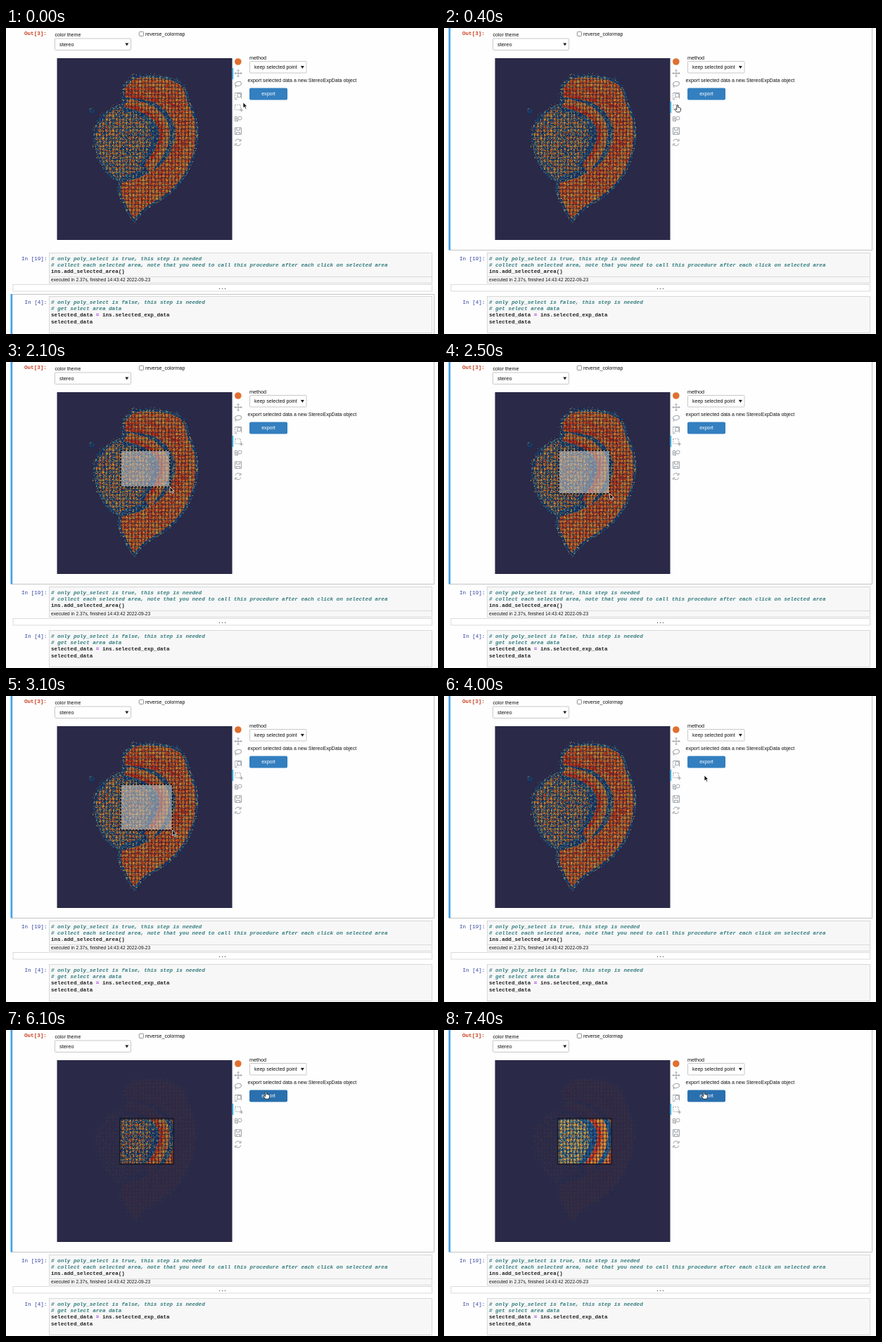
These frames come from a looping animation (614 px wide and 436 px high, 8000 ms). An HTML page with a canvas:

```html
<!DOCTYPE html>
<html lang="en">
<head>
<meta charset="utf-8">
<title>Area selection in a notebook</title>
<style>
html, body { margin: 0; width: 100%; height: 100%; overflow: hidden; background: #fefefe; }
svg, canvas { position: absolute; left: 0; top: 0; width: 614px; height: 436px; }
text { font: 7.05px "Liberation Sans", Arial, sans-serif; fill: #111; white-space: pre; }
.code text { font: bold 7.6px "Liberation Mono", "Courier New", monospace; fill: #222; }
.code .note { font-style: italic; fill: #347d7f; }
.code .prompt { font-weight: normal; fill: #303f9f; }
.code .out { fill: #c8401f; font-weight: bold; }
.box { fill: #f7f7f7; stroke: #d2d2d2; stroke-width: .8; }
.field { fill: #fff; stroke: #c8c8c8; }
.icons { fill: none; stroke: #9da2a7; stroke-width: 1; }
#picked { clip-path: inset(126px 376px 245px 162px); }
</style>
</head>
<body>
<svg viewBox="0 0 614 436">
  <rect width="614" height="436" fill="#fefefe"/>
  <g id="cell">
    <path id="frame" fill="none" stroke="#c4c4c4"/>
    <path id="bar" fill="#42a1e8"/>
  </g>

  <rect class="box" x="61.5" y="320.5" width="544" height="43"/>
  <path d="M62 354.5H605" stroke="#d5d5d5" stroke-width=".8"/>
  <rect x="10" y="365.5" width="595.5" height="9.5" fill="#fff" stroke="#d2d2d2" stroke-width=".8"/>
  <rect class="box" x="61.5" y="382.5" width="544" height="52"/>
  <g fill="#555"><circle cx="303.5" cy="371.5" r=".7"/><circle cx="307.5" cy="371.5" r=".7"/><circle cx="311.5" cy="371.5" r=".7"/></g>

  <g class="code">
    <text class="prompt out" x="26" y="9.5">Out[3]:</text>
    <text class="prompt" x="22" y="330.5">In [19]:</text>
    <text class="note" x="64" y="330.5"># only poly_select is true, this step is needed</text>
    <text class="note" x="64" y="340"># collect each selected area, note that you need to call this procedure after each click on selected area</text>
    <text x="64" y="349.3">ins.add_selected_area()</text>
    <text class="prompt" x="26.5" y="392.8">In [4]:</text>
    <text class="note" x="64" y="392.8"># only poly_select is false, this step is needed</text>
    <text class="note" x="64" y="402"># get select area data</text>
    <text x="64" y="411.3">selected_data <tspan fill="#a42be0">=</tspan> ins.selected_exp_data</text>
    <text x="64" y="420.5">selected_data</text>
  </g>
  <text x="64" y="361.3" style="font-size:6.6px">executed in 2.37s, finished 14:43:42 2022-09-23</text>

  <text x="69.5" y="11.8">color theme</text>
  <rect class="field" x="69.5" y="15" width="108" height="16.5" rx="1"/>
  <text x="76" y="25.8" style="font-size:7.4px">stereo</text>
  <path d="M169.3 21.5h5l-2.5 4zM418.8 54h5l-2.5 4z" fill="#222"/>
  <rect x="189.3" y="5.3" width="6.2" height="6.2" rx="1" fill="#fff" stroke="#777" stroke-width=".8"/>
  <text x="198" y="11.2">reverse_colormap</text>

  <text x="346" y="44.5" style="font-size:7.2px">method</text>
  <rect class="field" x="346.5" y="47.5" width="80.5" height="16.5" rx="1"/>
  <text x="353" y="58.3">keep selected point</text>
  <path d="M418.8 54h5l-2.5 4z" fill="#222"/>
  <text x="343.5" y="77.3">export selected data a new StereoExpData object</text>
  <rect id="button" x="346" y="85.5" width="54" height="17" rx="2"/>
  <text x="373" y="96.2" text-anchor="middle" style="fill:#fff">export</text>

  <rect x="72.5" y="43" width="249" height="259" fill="#2a2947"/>
  <circle cx="329.8" cy="48" r="4.8" fill="#e0702f"/>
  <rect id="active" x="321.5" width="1.6" height="16" fill="#26aae1"/>
  <g class="icons">
    <path d="M325 64.5h10M330 59.5v10M326.5 63l-1.5 1.5 1.5 1.5M333.500 63l1.5 1.500-1.500 1.500M328.500 61l1.500-1.500 1.500 1.500M328.500 68l1.500 1.500 1.500-1.500"/>
    <ellipse cx="330" cy="79.5" rx="4.5" ry="3" transform="rotate(-12 330 79.5)"/>
    <path d="M327 82q-2 1 0 3"/>
    <path d="M325.500 93v9h4" stroke-dasharray="1.500 1"/>
    <circle cx="331.300" cy="96" r="2.800"/><path d="M329.300 98l-3 3.500M325.500 92.500h9v8"/>
    <path d="M325.500 109.500h8v7h-8z" stroke-dasharray="1.500 1.300"/>
    <path d="M334.500 114.500v5M332 117h5"/>
    <circle cx="332.500" cy="128.500" r="2.500"/><path d="M330.500 130.500l-2 3M325.500 126.500h3v6h-3zM325.500 129.500h3"/>
    <path d="M325.500 142h9v9.500h-9zM327.500 142v3.500h5v-3.500M327.500 151v-2.500h5v2.500"/>
    <path d="M326 161.500a4 4 0 0 1 7.500-1M333.700 164.500a4 4 0 0 1-7.500 1M334 158v3h-3M325.700 168v-3h3"/>
  </g>
</svg>
<canvas id="tissue" width="614" height="436"></canvas>
<canvas id="picked" width="614" height="436"></canvas>
<svg viewBox="0 0 614 436">
  <rect id="edge" x="162" y="126" width="76" height="65" fill="none" stroke="#11121d" stroke-width="1.300"/>
  <rect id="drag" x="163" y="126" fill="#d3d3d3" fill-opacity=".5" stroke="#000" stroke-width="1.500" stroke-dasharray="2.500 2.200"/>
  <path id="arrow" d="M0 0v8l1.900-1.700 1.300 3 1.400-.6-1.300-2.900h2.500z" fill="#111" stroke="#fff" stroke-width=".7"/>
  <path id="hand" d="M-.8 0q.9-.8 1.700 0v3q2-.5 2.300.8 1.700-.2 1.800 1v2q-.2 2-1.500 3h-4.200l-3-3.700q.2-1.500 1.500-.7l1.400 1z" fill="#fff" stroke="#111" stroke-width=".8"/>
</svg>
<script>
const LOOP = 8000, STEP = 100;
const $ = id => document.getElementById(id);
const set = (el, attrs) => { for (const k in attrs) el.setAttribute(k, attrs[k]); };
const show = (el, on) => { el.style.visibility = on ? 'visible' : 'hidden'; };
const mix = (a, b, p) => a + (b - a) * p;
const ease = p => p * p * (3 - 2 * p);

// Colour scale: low expression is blue, high is red.
const SCALE = [[24, 56, 118], [25, 104, 160], [214, 178, 72], [228, 128, 42], [208, 42, 24]];
function colour(v) {
  const p = Math.min(.999, Math.max(0, v)) * (SCALE.length - 1), i = Math.floor(p);
  return SCALE[i].map((c, k) => mix(c, SCALE[i + 1][k], p - i));
}

function hash(x, y) {
  let h = Math.imul(x, 374761393) + Math.imul(y, 668265263) | 0;
  h = Math.imul(h ^ h >>> 13, 1274126177);
  return ((h ^ h >>> 16) >>> 0) / 4294967296;
}

const OUTLINE = 'M166 84Q176 67 192 67Q228 66 247 76Q260 88 261 106Q272 122 273 150Q271 190 252 216Q236 238 208 253Q192 262 183 278Q172 266 167 250Q156 236 161 218Q140 212 131 184Q122 162 126 143Q134 118 164 108Q167 96 166 84Z';
// Bands of [path, level, width]
const BANDS = [
  ['M166 94C198 90 246 96 251 128C256 168 240 198 206 222', .86, 16],
  ['M168 104C214 102 240 126 235 158C230 186 210 205 164 216', .2, 9],
  ['M172 105C212 108 231 130 229 155C226 178 212 190 203 204', .72, 7],
  ['M166 113C204 122 214 138 213 154C211 172 202 184 192 198', .2, 10],
  ['M168 110C206 117 223 136 221 154C218 172 207 184 198 198', 1, 5],
  ['M168 91C176 101 200 99 216 104', 1, 4],
  [OUTLINE, .16, 7]
];

// Levels are painted as greys, so the alpha channel holds the outline.
function levels() {
  const c = document.createElement('canvas');
  c.width = 614; c.height = 436;
  const g = c.getContext('2d');
  const grey = v => `rgb(${v * 255},${v * 255},${v * 255})`;
  const body = new Path2D(OUTLINE);
  g.fillStyle = grey(.79);
  g.fill(body);
  g.save();
  g.clip(body);
  g.fillStyle = grey(.42);
  g.beginPath();
  g.ellipse(168, 162, 44, 53, -.15, 0, 7);
  g.fill();
  for (const [d, v, w] of BANDS) {
    g.strokeStyle = grey(v);
    g.lineWidth = w;
    g.stroke(new Path2D(d));
  }
  g.restore();
  g.fillStyle = grey(.1);
  g.beginPath();
  g.ellipse(122, 119, 2.500, 5, 0, 0, 7);
  g.fill();
  return g.getImageData(0, 0, 614, 436).data;
}

const LEVELS = levels();
const PITCH_X = 4.75, PITCH_Y = 5.4;
const line = (p, pitch) => Math.max(0, 1 - Math.abs((p % pitch) - pitch / 2) / 1.250);

function paint(canvas, noise, grid, light) {
  const g = canvas.getContext('2d'), img = g.createImageData(614, 436);
  for (let y = 60; y < 285; y++) for (let x = 112; x < 282; x++) {
    const i = (y * 614 + x) * 4;
    const r = hash(x, y), cell = hash(Math.floor(x / 2) + 900, Math.floor(y / 2));
    // Stray dots scatter just past the rim.
    const dx = Math.round((r - .5) * 9), dy = Math.round((cell - .5) * 9);
    const inside = LEVELS[i + 3] > 100;
    const j = inside ? i : ((y + dy) * 614 + x + dx) * 4;
    if (!inside && (LEVELS[j + 3] < 100 || hash(y, x) > .4)) continue;
    const base = inside ? LEVELS[i] / 255 : .08;
    const spread = noise * (base > .3 && base < .6 ? 1.400 : .8);
    const v = base + (r + cell - 1) * spread;
    const dark = Math.min(1, line(x, PITCH_X) * grid + line(y, PITCH_Y) * grid * .75);
    const shade = light * (1 - noise * .45 * hash(x + 50, y + 70));
    const rgb = colour(v), ground = [34, 36, 66];
    for (let k = 0; k < 3; k++) img.data[i + k] = mix(rgb[k] * shade, ground[k], dark);
    img.data[i + 3] = 255;
  }
  g.putImageData(img, 0, 0);
}

// Pointer track: [time, x, y]
const TRACK = [
  [0, 337, 106], [100, 337, 106], [200, 331.500, 110], [700, 331.500, 110],
  [1200, 163, 125], [1500, 163, 126], [2100, 233, 178], [2700, 236.500, 191],
  [3300, 236.500, 191], [4000, 370, 113], [4700, 370, 113], [4900, 369.500, 88.500], [LOOP, 369.500, 88.500]
];
function pointer(t) {
  const n = TRACK.findIndex(k => k[0] > t), [t0, x0, y0] = TRACK[n - 1], [t1, x1, y1] = TRACK[n];
  const p = ease((t - t0) / (t1 - t0));
  return [mix(x0, x1, p), mix(y0, y1, p)];
}

let sharp = null;
function draw(t) {
  const [x, y] = pointer(t);
  const clicked = t >= 200, cut = t >= 4300, overButton = t >= 4800;
  const hand = t >= 200 && t < 800 || overButton;
  const dragging = t > 1500 && t < 3300;

  set($('frame'), { d: clicked ? 'M8 316.500H608.500V0' : 'M8 436V379.500H608.500V436' });
  set($('bar'), { d: clicked ? 'M6.500 0h2.700v316.500h-2.700z' : 'M6.500 379h2.700v57h-2.700z' });
  set($('active'), { y: clicked ? 105 : 57 });
  set($('button'), { fill: overButton ? '#2a70ae' : '#337fbf' });

  $('tissue').style.opacity = !cut ? 1 : t < 6000 ? .035 : .075;
  show($('picked'), cut);
  show($('edge'), cut);
  if (cut && sharp !== t >= 6700) {
    sharp = t >= 6700;
    if (sharp) paint($('picked'), .3, .72, 1.060);
    else paint($('picked'), .6, .7, .95);
  }

  show($('drag'), dragging);
  if (dragging) set($('drag'), { width: x - 163, height: Math.max(0, y - 126) });
  for (const id of ['arrow', 'hand']) set($(id), { transform: `translate(${x} ${y})` });
  show($('arrow'), !hand);
  show($('hand'), hand);
}

paint($('tissue'), .55, .7, .95);
function tick() {
  draw(Math.floor(performance.now() % LOOP / STEP) * STEP);
  requestAnimationFrame(tick);
}
tick();
</script>
</body>
</html>
```
